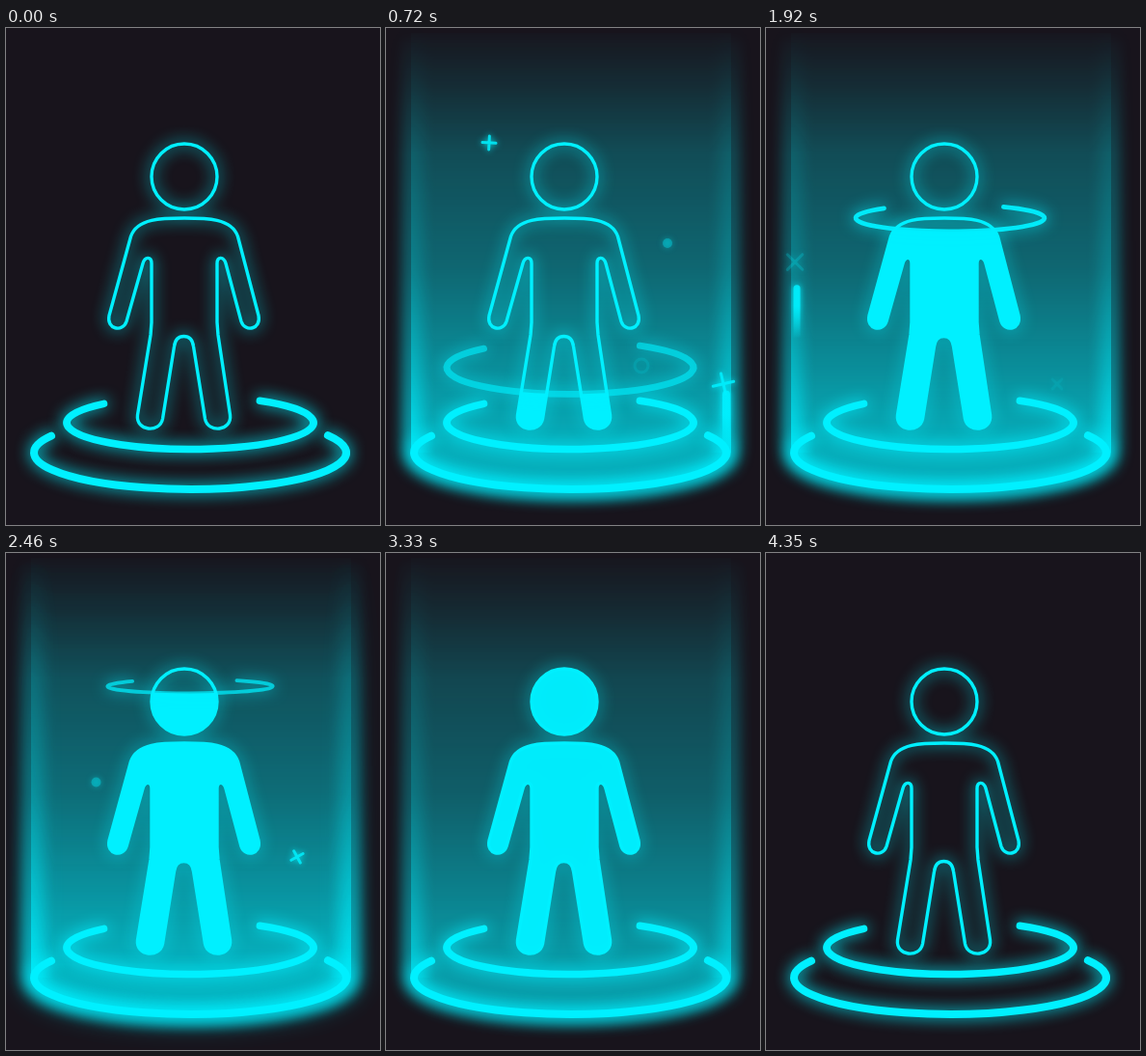
Write an HTML page with a canvas that moves like this. It is 388x515 px and loops after 5.46 s.

```html
<!DOCTYPE html>
<html lang="en">
<head>
<meta charset="utf-8">
<title>Neon body scan</title>
<style>
html, body { margin: 0; width: 100%; height: 100%; overflow: hidden; background: #18141c; }
canvas { display: block; }
</style>
</head>
<body>
<canvas id="stage" width="388" height="515"></canvas>
<script>
const W = 388, H = 515, LOOP = 5460, CX = 191, FLOOR = 438;
const CYAN = '#00f0ff', CLEAR = 'rgba(0,240,255,0)';
const ctx = document.getElementById('stage').getContext('2d');

// Linear interpolation through [time, value] points, held at both ends.
function track(points, t) {
  if (t <= points[0][0]) return points[0][1];
  for (let i = 1; i < points.length; i++) {
    const [t0, a] = points[i - 1], [t1, b] = points[i];
    if (t < t1) return a + (b - a) * (t - t0) / (t1 - t0);
  }
  return points[points.length - 1][1];
}

const TUBE = [[30, 0], [570, 1], [2310, 1], [2850, 1.4], [3750, .45], [4320, 0]];
const SCAN_Y = [[270, 409], [720, 352], [1260, 282], [1920, 197], [2880, 92.5], [3000, 85]];
const SCAN_RX = [[85, 75], [92, 76], [197, 98], [282, 116], [352, 128]];
const SCAN_RY = [[85, 1.5], [92, 2], [197, 14], [282, 21], [352, 27.5]];
const SCAN_ALPHA = [[270, 0], [720, .6], [1000, 1], [1920, .95], [2500, .7], [2880, .17], [3000, 0]];
const FILL_ALPHA = [[3300, 1], [3750, .62], [4320, 0]];

// x and y hold at time `at`; y then rises at `speed` px/ms.
const PARTICLES = [
  { draw: plus, x: 350, y: 369, at: 720, speed: .209, from: 440, to: 1500, size: 11, angle: -13, spin: -.009 },
  { draw: plus, x: 30, y: 380, at: 1260, speed: .208, from: 1080, to: 1995, size: 11, angle: 15, spin: .045 },
  { draw: plus, x: 107, y: 119, at: 720, speed: .07, from: 300, to: 1110, size: 7, angle: 3, spin: .02 },
  { draw: plus, x: 304, y: 146, at: 1260, speed: .1, from: 850, to: 1680, size: 7, angle: 12, spin: .03 },
  { draw: plus, x: 302, y: 369, at: 1920, speed: .1, from: 1900, to: 2750, size: 7, angle: 45, spin: .03 },
  { draw: dot, x: 292, y: 223, at: 720, speed: .08, from: 250, to: 840, size: 5 },
  { draw: dot, x: 93.5, y: 204, at: 2880, speed: .08, from: 2380, to: 3080, size: 5 },
  { draw: bubble, x: 265, y: 340, at: 1260, speed: .0185, from: 690, to: 1650, size: 7 },
  { draw: streak, x: 353, y: 272, at: 1260, speed: .2, from: 500, to: 1640, size: 115, width: 8 },
  { draw: streak, x: 32, y: 270, at: 1920, speed: .2, from: 1200, to: 2250, size: 52, width: 7 },
  { draw: streak, x: 247, y: 189, at: 1260, speed: .15, from: 950, to: 1600, size: -42, width: 4 }
];

function plus(p, age) {
  ctx.rotate((p.angle + p.spin * age) * Math.PI / 180);
  ctx.lineWidth = 3;
  ctx.beginPath();
  ctx.moveTo(-p.size, 0); ctx.lineTo(p.size, 0);
  ctx.moveTo(0, -p.size); ctx.lineTo(0, p.size);
  ctx.stroke();
}

function dot(p) {
  ctx.beginPath();
  ctx.arc(0, 0, p.size, 0, 7);
  ctx.fill();
}

function bubble(p) {
  ctx.lineWidth = 3;
  ctx.beginPath();
  ctx.arc(0, 0, p.size, 0, 7);
  ctx.stroke();
}

// Bright at the head, fading along the tail, never below the floor.
function streak(p, age, y) {
  const length = Math.min(p.size, FLOOR - y);
  if (y >= FLOOR) return;
  const fade = ctx.createLinearGradient(0, 0, 0, length);
  fade.addColorStop(0, CYAN);
  fade.addColorStop(.35, CYAN);
  fade.addColorStop(1, CLEAR);
  ctx.strokeStyle = fade;
  ctx.lineWidth = p.width;
  ctx.beginPath();
  ctx.moveTo(0, 0); ctx.lineTo(0, length);
  ctx.stroke();
}

function drawParticles(t) {
  for (const p of PARTICLES) {
    if (t <= p.from || t >= p.to) continue;
    const age = t - p.at, y = p.y - p.speed * age;
    ctx.save();
    ctx.globalAlpha = .85 * Math.min(1, (t - p.from) / 200, (p.to - t) / 300);
    ctx.shadowBlur = 6;
    ctx.translate(p.x, y);
    p.draw(p, age, y);
    ctx.restore();
  }
}

function buildBody() {
  const right = `M185 197 H185 C208 197 234 197 240.5 216 L262 298 C265 312 248 316 244 304
    L228 244 C226 237 219 236 219 244 L219 305 L220 318 L232.5 401 C234.5 418 209.5 420 206.5 405
    L194.5 330 C193.5 322 190 319.5 184.5 319.5`;
  const left = `C179 319.5 175.5 322 174.5 330 L162.5 405 C159.5 420 134.5 418 136.5 401 L150 318 L151 305
    L151 244 C151 236 144 237 142 244 L125 304 C121 316 104 312 107 298
    L129.5 216 C136 197 162 197 185 197 Z`;
  const path = new Path2D(right + left);
  path.moveTo(219, 154);
  path.arc(185, 154, 34, 0, Math.PI * 2);
  return path;
}
const BODY = buildBody();

const WALL = new Path2D();
WALL.moveTo(26, 5);
WALL.lineTo(26, 440);
WALL.ellipse(192, 440, 166, 40, 0, Math.PI, 0, true);
WALL.lineTo(358, 5);

// Offscreen layer whose content fades out towards the top.
function fadedLayer(paint) {
  const layer = document.createElement('canvas');
  layer.width = W; layer.height = H;
  const c = layer.getContext('2d');
  paint(c);
  const mask = c.createLinearGradient(0, 5, 0, 430);
  for (const [y, a] of [[5, .02], [60, .16], [130, .37], [250, .54], [350, .79], [430, 1]])
    mask.addColorStop((y - 5) / 425, `rgba(0,0,0,${a})`);
  c.globalCompositeOperation = 'destination-in';
  c.fillStyle = mask;
  c.fillRect(0, 0, W, H);
  return layer;
}

function glowWall(c, width, blur) {
  c.strokeStyle = CYAN;
  c.lineWidth = width;
  c.filter = `blur(${blur}px)`;
  c.stroke(WALL);
  c.filter = 'none';
}

const TUBE_LAYER = fadedLayer(c => {
  c.fillStyle = 'rgba(0,240,255,.7)';
  c.fill(WALL);
  glowWall(c, 13, 8);
  for (const [edge, inner] of [[26, 50], [358, 334]]) {
    const side = c.createLinearGradient(edge, 0, inner, 0);
    side.addColorStop(0, 'rgba(0,240,255,.35)');
    side.addColorStop(1, CLEAR);
    c.fillStyle = side;
    c.fillRect(Math.min(edge, inner), 5, 24, 435);
  }
});
const FLARE_LAYER = fadedLayer(c => glowWall(c, 26, 11));

function drawTube(strength) {
  ctx.globalAlpha = Math.min(1, strength);
  ctx.drawImage(TUBE_LAYER, 0, 0);
  if (strength > 1) {
    ctx.globalAlpha = strength - 1;
    ctx.drawImage(TUBE_LAYER, 0, 0);
    ctx.globalAlpha = 2 * (strength - 1);
    ctx.drawImage(FLARE_LAYER, 0, 0);
  }
  ctx.globalAlpha = 1;
}

// Open ellipse with its gap at the back.
function drawRing(y, rx, ry, width, start, end) {
  ctx.lineWidth = width;
  ctx.shadowBlur = 16;
  ctx.beginPath();
  ctx.ellipse(CX, y, rx, ry, 0, start, end);
  ctx.stroke();
}

function drawFill(y, rx, ry, alpha) {
  ctx.save();
  ctx.beginPath();
  ctx.moveTo(0, H);
  ctx.lineTo(0, y);
  ctx.lineTo(CX - rx, y);
  ctx.ellipse(CX, y, rx, ry, 0, Math.PI, 0, true);
  ctx.lineTo(W, y);
  ctx.lineTo(W, H);
  ctx.clip();
  ctx.globalAlpha = alpha;
  ctx.shadowBlur = 0;
  ctx.fill(BODY);
  ctx.restore();
}

function draw(t) {
  ctx.fillStyle = '#18141c';
  ctx.shadowBlur = 0;
  ctx.fillRect(0, 0, W, H);
  drawTube(track(TUBE, t));

  ctx.fillStyle = ctx.strokeStyle = ctx.shadowColor = CYAN;
  ctx.lineCap = ctx.lineJoin = 'round';
  drawRing(440, 162, 38, 8, -.49, Math.PI + .476);
  drawRing(409, 128, 27.5, 7.5, -.97, Math.PI + .797);
  drawParticles(t);

  const y = track(SCAN_Y, t), rx = track(SCAN_RX, y), ry = track(SCAN_RY, y);
  ctx.lineWidth = 3.4;
  ctx.shadowBlur = 16;
  ctx.stroke(BODY);
  drawFill(y, rx, ry, track(FILL_ALPHA, t));

  ctx.globalAlpha = track(SCAN_ALPHA, t);
  drawRing(y, rx, ry, 3 + (rx - 75) * .073, -.97, Math.PI + .797);
  ctx.globalAlpha = 1;
}

const begin = performance.now();
function frame() {
  draw((performance.now() - begin) % LOOP);
  requestAnimationFrame(frame);
}
frame();
</script>
</body>
</html>
```
